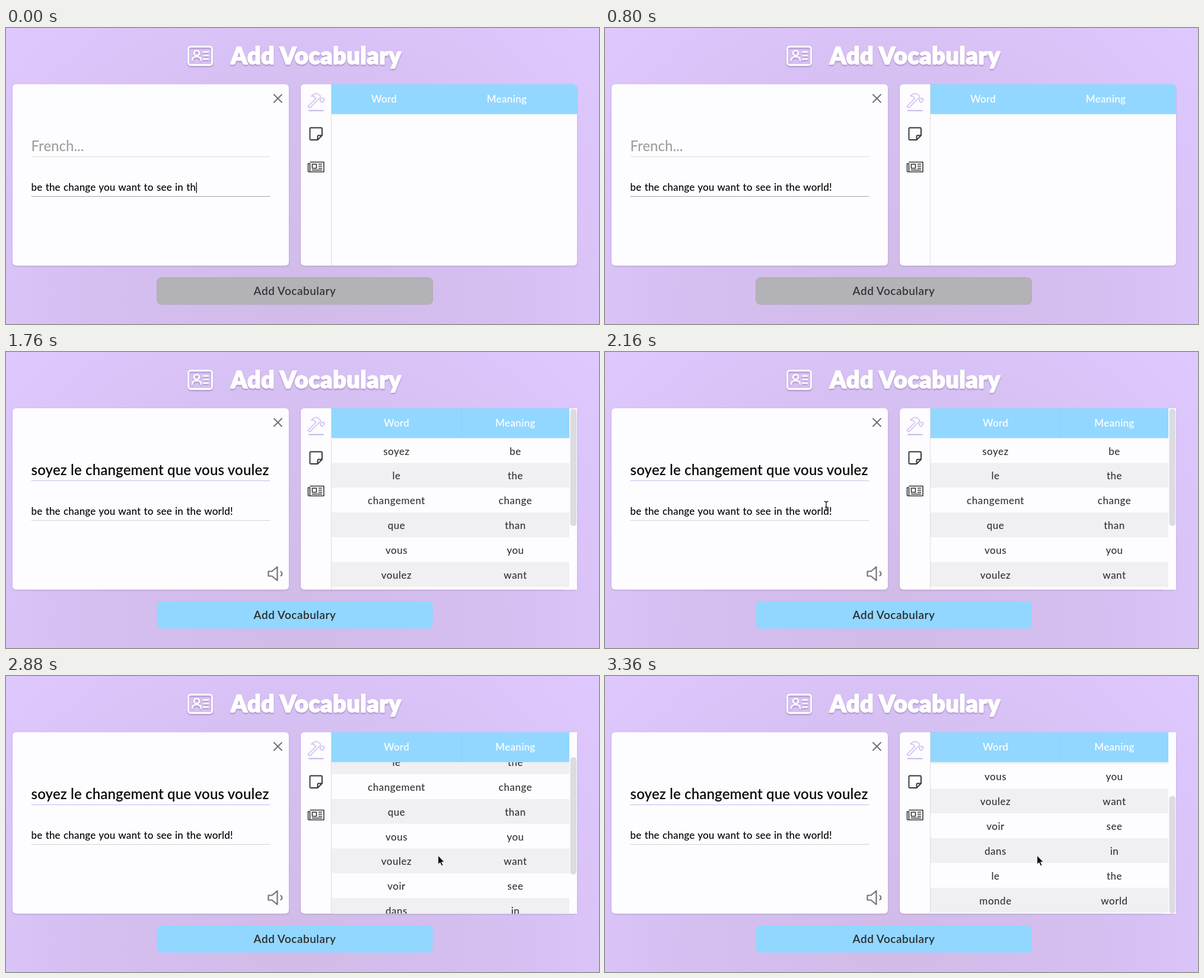
Animation of 1000x500 px, one loop 3.44 s. Source, as an HTML page:

```html
<!DOCTYPE html>
<html lang="en">
<head>
<meta charset="utf-8">
<title>Add Vocabulary</title>
<style>
  html, body { margin: 0; width: 100%; height: 100%; overflow: hidden; background: #d9c3f8; }
  svg { display: block; width: 100vw; height: 100vh; }
  text { font-family: Lato, "Open Sans", sans-serif; font-weight: 500; white-space: pre; }
  .mid { text-anchor: middle; }
  .line { fill: none; stroke-linecap: round; stroke-linejoin: round; }
  .title { font-size: 39px; font-weight: 900; letter-spacing: .8px; fill: #fff; stroke: #fff; stroke-width: 1.8; stroke-linejoin: round; }
  .raised { filter: drop-shadow(0 2px 1px rgba(110, 85, 140, .42)); }
  .card { fill: #fdfcff; filter: drop-shadow(0 1px 1px rgba(90, 65, 125, .32)); }
  .big { font-size: 24px; }
  .small { font-size: 17px; letter-spacing: .16px; word-spacing: .8px; }
  .head { font-size: 17px; font-weight: 600; letter-spacing: .3px; fill: #fdfcff; }
  .cell { font-size: 17px; letter-spacing: .5px; fill: #333; }
  .label { font-size: 19px; font-weight: 600; letter-spacing: .5px; }
</style>
</head>
<body>
<svg viewBox="0 0 1000 500" preserveAspectRatio="none">
  <defs>
    <radialGradient id="glow" gradientUnits="userSpaceOnUse" cx="487" cy="470" r="690">
      <stop offset="0" stop-color="#d1bbe8"/>
      <stop offset=".5" stop-color="#d5bff1"/>
      <stop offset="1" stop-color="#dec8ff"/>
    </radialGradient>
    <clipPath id="inputClip"><rect x="42" y="180" width="404" height="40"/></clipPath>
    <clipPath id="cardClip"><rect x="497" y="95" width="466" height="306.5" rx="6"/></clipPath>
    <clipPath id="bodyClip"><rect x="549" y="145.5" width="401" height="256"/></clipPath>
  </defs>

  <rect width="1000" height="500" fill="url(#glow)"/>

  <g class="raised">
    <g class="line" stroke="#fff" stroke-width="2.8">
      <rect x="307.5" y="31.5" width="40" height="31" rx="4"/>
      <circle cx="321.5" cy="42.5" r="4.4"/>
      <path d="M314 54.5c0-4 2.5-6 7.5-6s7.5 2 7.5 6M333 40.5h8M334 46.500h7M333 52.5h8" stroke-width="2.4"/>
    </g>
    <text class="title" x="379" y="60.5">Add Vocabulary</text>
  </g>

  <rect class="card" x="11" y="95" width="466" height="306.5" rx="6"/>
  <path class="line" d="M452 112.5l13 13m0-13l-13 13" stroke="#707070" stroke-width="2"/>
  <g clip-path="url(#inputClip)"><text id="french" class="big" x="42.5" y="207.5"></text></g>
  <path id="frenchLine" d="M42.5 217.5H445.5"/>
  <text id="english" class="small" x="42.5" y="274.5"></text>
  <path id="caret" d="M0 260.5V278.5" stroke="#222" stroke-width="1.5"/>
  <path id="englishLine" d="M42.5 284.5H445.5"/>
  <path id="speaker" class="line" d="M442.5 370.5h6l9-7.5v23l-9-7.5h-6zM463.5 371q4 3.5 0 7" stroke="#747474" stroke-width="2.2"/>

  <rect class="card" x="497" y="95" width="466" height="306.5" rx="6"/>
  <path id="corner" d="M940 95H963V401.5H940z" fill="#fdfcff"/>
  <g class="line">
    <path d="M509.5 132l13-13-2-2.5q-2.5-2-5.5-1.5 4.5-5 10-4.5l5 4v3l2.5 2 3-1 1.5 2.5-4 5-3-2.5.5-2.5-2.5-2-14.5 15q-3 1.5-4-2z" stroke="#d0bdf0" stroke-width="1.6"/>
    <path d="M511 139.500H535" stroke="#c6b3e6" stroke-width="2"/>
    <path d="M514 168.5h17.5q1.5 0 1.5 1.5v11.5l-7.5 7.5H514q-1.5 0-1.5-1.5V170q0-1.500 1.5-1.5zM533 181.5h-6q-1.5 0-1.5 1.5v6" stroke="#333" stroke-width="1.9"/>
    <path d="M513 226.5h23v16.5h-25q-1.500 0-1.500-1.500V229h3v12.500M516.5 230h7v7h-7zM527.5 230h5M527.5 233.5h5M527.5 237h5M516.5 240h16" stroke="#333" stroke-width="1.6"/>
  </g>
  <g id="table">
    <g clip-path="url(#bodyClip)"><g id="rows"></g></g>
    <rect id="thumb" x="951.5" width="10.5" height="198" rx="5" fill="#dcdbdf"/>
  </g>
  <g clip-path="url(#cardClip)">
    <rect id="header" x="549" y="95" height="50.5" fill="#92d7ff"/>
    <path id="divider" d="M768.5 96V145" stroke="#83c3e6" stroke-dasharray="1 2"/>
    <text id="wordHead" class="head mid" y="125.5">Word</text>
    <text id="meaningHead" class="head mid" y="125.5">Meaning</text>
  </g>
  <path d="M548.5 95V401.5" stroke="#dddce0"/>

  <rect id="button" x="254.5" y="421.5" width="465" height="45.5" rx="8"/>
  <text id="label" class="label mid" x="487" y="450.5">Add Vocabulary</text>

  <path id="beam" class="line" d="M-3-7.5q3 0 3 2v11q0 2-3 2M3-7.5q-3 0-3 2M3 7.5q-3 0-3-2M-1.5 2h3" stroke="#222" stroke-width="1.4"/>
  <path id="arrow" d="M0 0V15.5l3.5-3.2 2.6 5.7 2.6-1.2-2.5-5.5h4.8z" fill="#111" stroke="#fff"/>
</svg>
<script>
const LOOP = 3440, STEP = 80, ROW = 41.85, TOP = 145.5;
const TYPED = 'be the change you want to see in th', REST = 'e world!';
const FRENCH = 'soyez le changement que vous voulez voir dans le monde';
const PAIRS = [['soyez', 'be'], ['le', 'the'], ['changement', 'change'], ['que', 'than'], ['vous', 'you'],
  ['voulez', 'want'], ['voir', 'see'], ['dans', 'in'], ['le', 'the'], ['monde', 'world']];
const BLUR = 880, TRANSLATED = 1040, LISTED = 1600;
const SCROLL = [[2640, 0], [2720, 26.6], [3040, 100], [3360, 164.4]];

const $ = id => document.getElementById(id);
const set = (id, attrs) => { for (const k in attrs) $(id).setAttribute(k, attrs[k]); };
const show = (id, on) => set(id, { visibility: on ? 'visible' : 'hidden' });
const clamp = v => Math.max(0, Math.min(1, v));
const smooth = v => v * v * (3 - 2 * v);

$('rows').innerHTML = PAIRS.map(([word, meaning], i) => {
  const y = TOP + i * ROW;
  const stripe = i % 2 ? `<rect x="549" y="${y}" width="401" height="${ROW}" fill="#f0eff2"/>` : '';
  const cell = (x, s) => `<text class="cell mid" x="${x}" y="${y + 28}">${s}</text>`;
  return stripe + cell(658.5, word) + cell(859, meaning);
}).join('');

function scrollAt(t) {
  let value = 0;
  for (let i = 1; i < SCROLL.length; i++) {
    const [t0, a] = SCROLL[i - 1], [t1, b] = SCROLL[i];
    value += (b - a) * clamp((t - t0) / (t1 - t0));
  }
  return value;
}

function drawInputs(t) {
  const k = Math.floor(t / STEP);
  $('english').textContent = TYPED + REST.slice(0, k < 7 ? k : k - 1);
  show('caret', t < 800);
  set('caret', { transform: `translate(${43.5 + $('english').getComputedTextLength()} 0)` });
  set('englishLine', { stroke: t < BLUR ? '#a2a2a4' : '#d2d2d4' });

  const done = t >= TRANSLATED;
  $('french').textContent = done ? FRENCH : 'French...';
  $('french').style.fontWeight = done ? 600 : 500;
  set('french', { fill: done ? '#0c0c0c' : '#a0a0a0', 'letter-spacing': done ? 0.15 : 0 });
  set('frenchLine', { stroke: done ? '#cdb9ee' : '#dedee0' });
  show('speaker', done);
  set('button', { fill: done ? '#92d7ff' : '#b3b2b6', stroke: done ? '#a6cdf8' : '#aeaab6' });
  set('label', { fill: done ? '#2c2c2e' : '#38333a' });
}

function drawTable(t) {
  const listed = t >= LISTED, y = scrollAt(t);
  for (const id of ['table', 'divider', 'corner']) show(id, listed);
  set('header', { width: listed ? 401 : 414 });
  set('wordHead', { x: listed ? 658.5 : 637.5 });
  set('meaningHead', { x: listed ? 859 : 844.5 });
  set('rows', { transform: `translate(0 ${-y})` });
  set('thumb', { y: 96 + 0.65 * y });
}

function drawPointer(t) {
  const p = smooth(clamp((t - 2160) / 400));
  const x = 373 + 355.5 * p, y = 260 + 43 * p;
  const moving = t >= 2160, overInput = x < 446;
  const transform = `translate(${x} ${y})`;
  show('beam', moving && overInput);
  show('arrow', moving && !overInput);
  set('beam', { transform });
  set('arrow', { transform });
}

function draw(now) {
  const t = Math.floor((now % LOOP) / STEP) * STEP;
  drawInputs(t);
  drawTable(t);
  drawPointer(t);
}

const start = performance.now();
function tick() {
  draw(performance.now() - start);
  requestAnimationFrame(tick);
}
tick();
</script>
</body>
</html>
```
